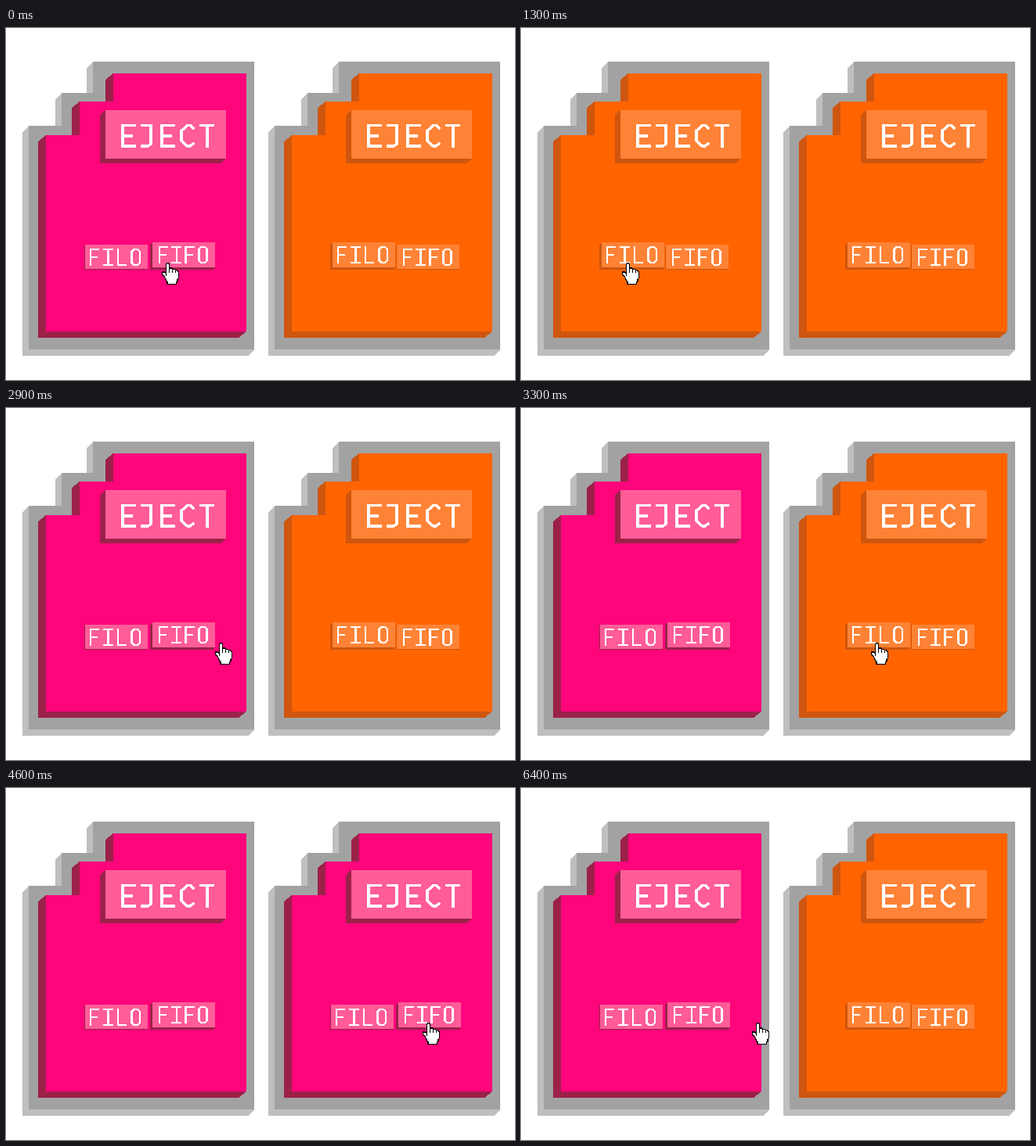
Write an HTML page that moves like this. It is 650 by 450 pixels and loops after 6600 ms.

```html
<!DOCTYPE html>
<html lang="en">
<head>
<meta charset="utf-8">
<title>Eject buttons</title>
<style>
  html, body { margin: 0; width: 100%; height: 100%; overflow: hidden; background: #fff; }
  svg { display: block; }
</style>
</head>
<body>
<svg id="stage" width="650" height="450" viewBox="0 0 650 450" shape-rendering="crispEdges"></svg>
<script>
const LOOP = 6600;
const PRESS = 100;
const PANEL_STEP = 314;

const GREY = { face: '#a2a2a2', side: '#bfbfbf' };
const PINK = { face: '#ff057c', side: '#9c2148', button: '#ff5c98', fifoUp: true };
const ORANGE = { face: '#ff6400', side: '#cf560f', button: '#ff8336', fifoUp: false };

// Strokes on a grid 4 units wide and 8 high.
const GLYPHS = {
  E: 'M4 0H0V8H4M0 4H3',
  J: 'M0 0H3V7L2 8H0',
  C: 'M4 1L3 0H2L0 2V6L2 8H3L4 7',
  T: 'M0 0H4M2 0V8',
  F: 'M4 0H0V8M0 4H3',
  I: 'M0 0H4M2 0V8M0 8H4',
  L: 'M0 0V8H4',
  O: 'M1 0H3L4 1V7L3 8H1L0 7V1Z'
};

// Staircase outline (upper left corners), extruded down and to the left.
function block(corners, right, bottom, dx, dy, face, side) {
  const [x0, y0] = corners[0];
  let front = `M${right} ${y0}H${x0}`;
  let back = front;
  corners.forEach(([x, y], i) => {
    const next = corners[i + 1];
    back += `L${x - dx} ${y + dy}`;
    if (next) {
      front += `V${next[1]}H${next[0]}`;
      back += `V${next[1]}H${next[0]}`;
    }
  });
  front += `V${bottom}H${right}Z`;
  back += `V${bottom + dy}H${right - dx}L${right} ${bottom}Z`;
  return `<path d="${back}" fill="${side}"/><path d="${front}" fill="${face}"/>`;
}

function word(text, x, y, advance, sx, sy) {
  const letters = [...text].map((c, i) =>
    `<path d="${GLYPHS[c]}" transform="translate(${x + i * advance + sx / 2} ${y + sy / 2}) scale(${sx} ${sy})"/>`);
  return `<g role="img" aria-label="${text}" fill="none" stroke="#fff" stroke-linecap="square">${letters.join('')}</g>`;
}

function smallButton(text, x, inset, advance, up, colors) {
  const left = up ? x + 2 : x;
  const top = up ? 274 : 277;
  const bottom = up ? 306 : 308;
  const depth = up ? 3 : 1;
  return block([[left, top]], left + 80, bottom, depth, depth, colors.button, colors.side) +
    word(text, left + inset, top + 5, advance, 2.55, 2.45);
}

function panel(colors) {
  return block([[137, 58], [94, 94], [51, 137]], 307, 388, 10, 8, colors.face, colors.side) +
    block([[127, 105]], 281, 167, 7, 6, colors.button, colors.side) +
    word('EJECT', 147, 123, 25.1, 3.7, 3.3) +
    smallButton('FILO', 101, 5.5, 17.6, !colors.fifoUp, colors) +
    smallButton('FIFO', 185, 7.5, 16.9, colors.fifoUp, colors);
}

const frame = block([[111, 43], [71, 83], [29, 125]], 317, 411, 8, 8, GREY.face, GREY.side);
const hand = 'M4.5 11.5V1.5L5.5 .5H6.5L7.5 1.5V5.5H9.5L10.5 6.5H12.5L13.5 7.5H14.5L16.5 9.5V15.5' +
  'L15.5 16.5V18.5L14.5 19.5V21.5H5.5V19.5L4.5 18.5V17.5L3.5 16.5V15.5L.5 11.5V9.5H2.5L4.5 11.5V13' +
  'M7.5 5.5V10M10.5 6.5V10M13.5 7.5V10';

const stage = document.getElementById('stage');
stage.innerHTML = [0, 1].map(i =>
  `<g transform="translate(${i * PANEL_STEP} 0)">${frame}
    <g class="pink">${panel(PINK)}</g><g class="orange">${panel(ORANGE)}</g></g>`).join('') +
  `<g id="cursor"><path d="${hand}" transform="scale(1.294 1.273)" fill="#fff" stroke="#000"/></g>`;

const pinks = stage.querySelectorAll('.pink');
const oranges = stage.querySelectorAll('.orange');
const cursor = document.getElementById('cursor');

const clicks = [500, 1800, 3800, 5100];
const stops = [[0, 199], [1100, 158], [1300, 129], [2900, 267], [3100, 375],
  [3300, 447], [4400, 498], [4600, 532], [6200, 409], [6400, 295]];

function render(t) {
  const between = (a, b) => t >= a && t < b;
  const isPink = [!between(clicks[0], clicks[1]), between(clicks[2], clicks[3])];
  isPink.forEach((on, i) => {
    pinks[i].setAttribute('display', on ? 'inline' : 'none');
    oranges[i].setAttribute('display', on ? 'none' : 'inline');
  });
  const x = stops.filter(([start]) => start <= t).pop()[1];
  const push = clicks.some(c => between(c, c + PRESS)) ? 2 : 0;
  cursor.setAttribute('transform', `translate(${x + push} ${300 + push})`);
}

const start = performance.now();
function tick() {
  render((performance.now() - start) % LOOP);
  requestAnimationFrame(tick);
}
tick();
</script>
</body>
</html>
```
